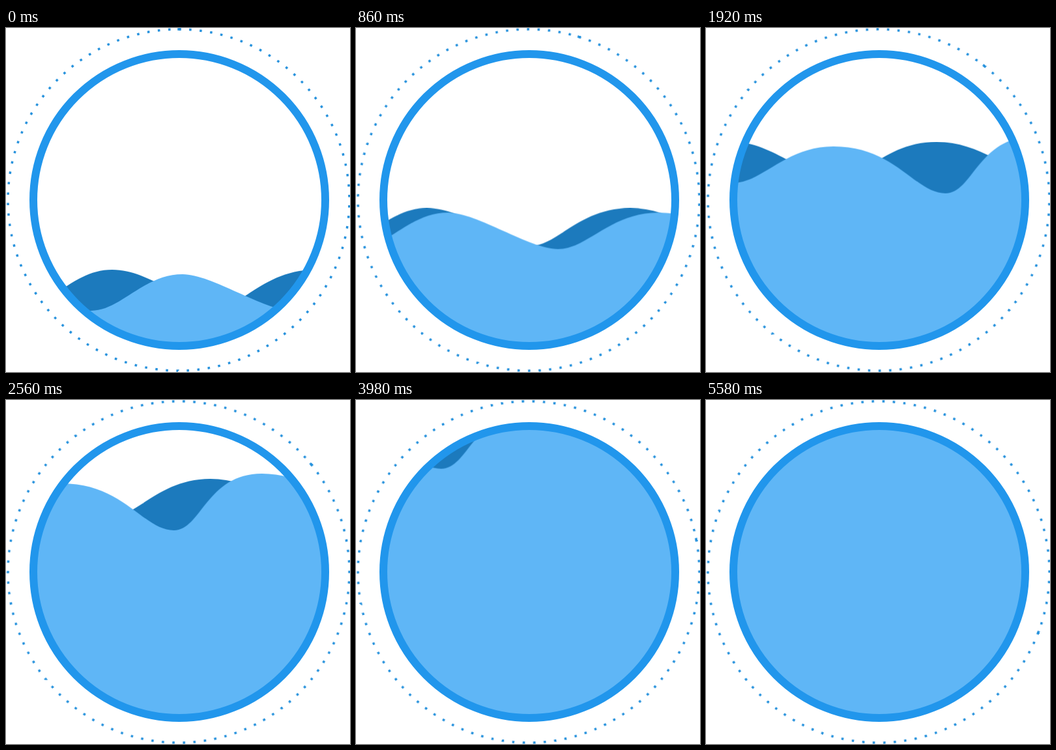
Animation of 528 by 528 pixels, one loop 5.6 s. Source, as an HTML page:

```html
<!DOCTYPE html>
<html lang="en">
<head>
<meta charset="utf-8">
<title>Filling circle</title>
<style>
  html, body { margin: 0; width: 100%; height: 100%; overflow: hidden; background: #fff; }
  svg { display: block; width: 528px; height: 528px; }

  .dots, .level, .front, .back { animation: 5600ms linear infinite; }
  .dots { animation-name: spin; transform-origin: 265px 264px; }
  .level { animation-name: rise; animation-timing-function: ease-out; }
  .front { animation-name: front; animation-timing-function: ease; }
  .back { animation-name: back; }

  .dots { fill: #2390dc; }
  .dots circle { fill: none; stroke: #2390dc; stroke-width: 3.5; }
  .front { fill: #5fb6f6; }
  .back { fill: #1c7abd; }
  .ring { fill: none; stroke: #2196ec; stroke-width: 12; }

  @keyframes spin { to { transform: rotate(111deg); } }
  @keyframes rise { to { transform: translateY(-392px); } }
  @keyframes front { to { transform: translateX(-672px); } }
  @keyframes back { to { transform: translateX(-353px); } }
</style>
</head>
<body>
<svg viewBox="0 0 528 528">
  <clipPath id="bowl"><circle cx="266" cy="264" r="220"/></clipPath>

  <g class="dots">
    <circle cx="265" cy="264" r="262" pathLength="1632"
            stroke-dasharray="3.5 12.5" transform="rotate(-90 265 264)"/>
    <rect x="263.2" y="0.25" width="5.3" height="3.5"/>
  </g>

  <g clip-path="url(#bowl)">
    <g class="level">
      <!-- each curve runs from trough to crest or back -->
      <path class="back" d="M-137 429
        c60 0 100 0 160 0 c45 0 80 -58 140 -58
        c60 0 115 58 160 58 c40 0 74 -58 152 -58
        c75 0 125 58 165 58 c40 0 74 -58 152 -58
        c75 0 125 58 165 58 V1000 H-137 Z"/>
      <path class="front" d="M-40 434 H131
        c45 0 80 -56 140 -56 c45 0 125 56 169 56
        c45 0 80 -56 154 -56 c95 0 125 72 172 72
        c42 0 50 -87 135 -87 c80 0 125 60 172 60
        c45 0 80 -50 155 -50 c95 0 125 50 172 50 V1000 H-40 Z"/>
    </g>
  </g>

  <circle class="ring" cx="266" cy="264" r="224"/>
</svg>
</body>
</html>
```
